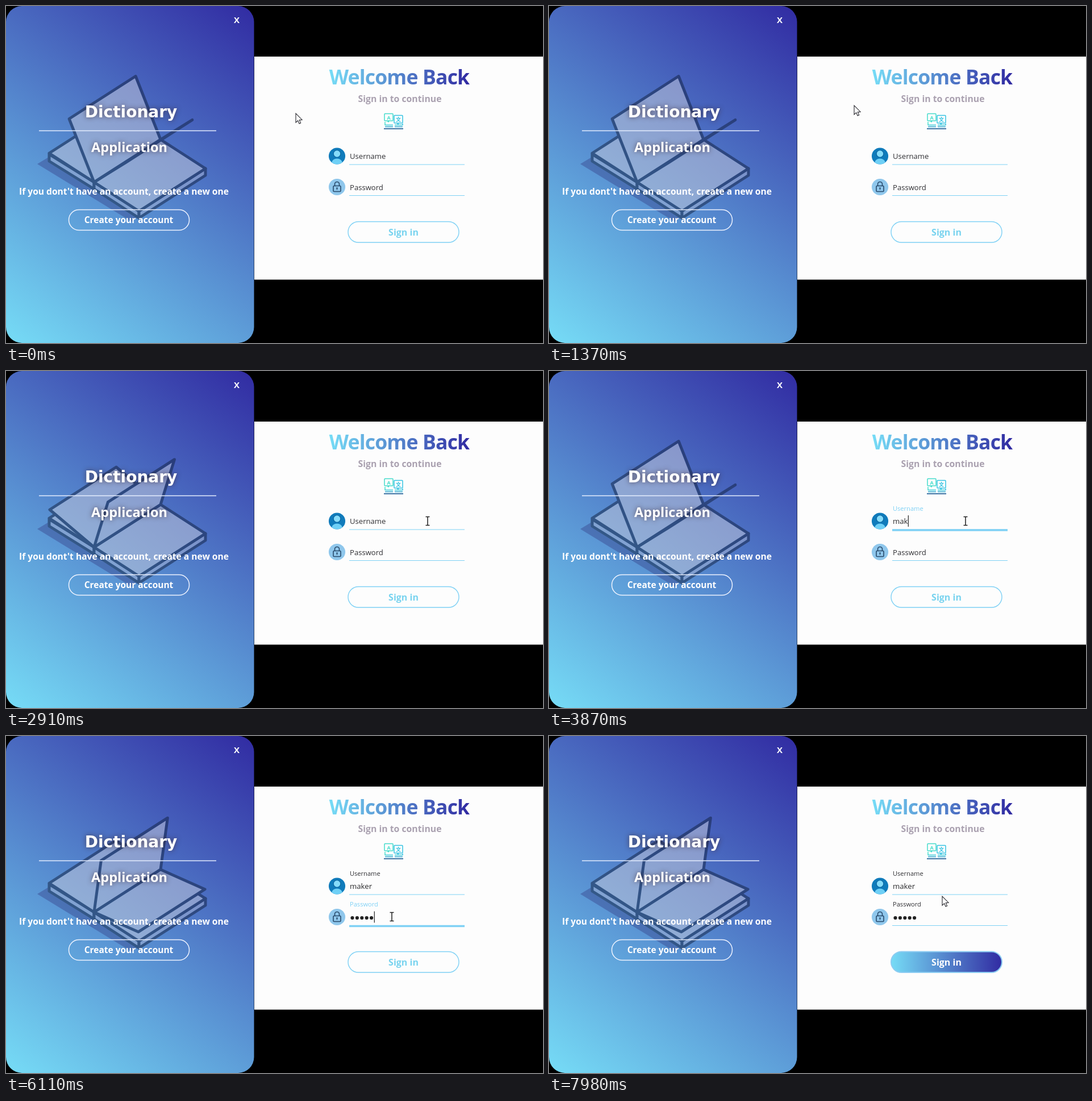
An HTML page with a canvas that plays this animation: 945 by 593 pixels, repeating every 8 s.

```html
<!DOCTYPE html>
<html lang="en">
<head>
<meta charset="utf-8">
<title>Dictionary sign in</title>
<style>
html, body { margin: 0; width: 100%; height: 100%; overflow: hidden; background: #000; }
canvas { display: block; width: 945px; height: 593px; }
</style>
</head>
<body>
<canvas id="stage" width="945" height="593"></canvas>
<script>
const W = 945, H = 593, LOOP = 8000;
const stage = document.getElementById('stage').getContext('2d');
const makeLayer = () => {
  const c = document.createElement('canvas');
  c.width = W;
  c.height = H;
  return c.getContext('2d');
};
const bookLayer = makeLayer(), frontLayer = makeLayer();
const UI = '"Open Sans", "Noto Sans", sans-serif';
const SKY = '#7fd1f5';

// ---------- helpers ----------
const clamp01 = v => Math.max(0, Math.min(1, v));
const mix = (a, b, k) => a + (b - a) * k;
const ease = k => k * k * (3 - 2 * k);
const add = (p, q) => [p[0] + q[0], p[1] + q[1]];

// Sky blue to indigo, shared by panel, title and button
function brand(g, x0, y0, x1, y1) {
  const grad = g.createLinearGradient(x0, y0, x1, y1);
  grad.addColorStop(0, '#76dcf6');
  grad.addColorStop(1, '#312ba2');
  return grad;
}

function text(g, str, x, y, font, fill, align = 'left', tracking = 0) {
  g.font = font;
  g.fillStyle = fill;
  g.textAlign = align;
  g.letterSpacing = tracking + 'px';
  g.fillText(str, x, y);
}

function paint(g, fill, stroke, width) {
  if (fill) { g.fillStyle = fill; g.fill(); }
  if (stroke) { g.strokeStyle = stroke; g.lineWidth = width; g.stroke(); }
}

function poly(g, pts, fill, stroke, width) {
  g.beginPath();
  pts.forEach(([x, y]) => g.lineTo(x, y));
  g.closePath();
  paint(g, fill, stroke, width);
}

function pill(g, x, y, w, h, r, fill, stroke, width) {
  g.beginPath();
  g.roundRect(x, y, w, h, r);
  paint(g, fill, stroke, width);
}

function disc(g, x, y, r, fill) {
  g.beginPath();
  g.arc(x, y, r, 0, Math.PI * 2);
  paint(g, fill);
}

function line(g, x0, y0, x1, y1, color, width) {
  g.beginPath();
  g.moveTo(x0, y0);
  g.lineTo(x1, y1);
  paint(g, null, color, width);
}

// ---------- book ----------
const INK = '#0f1e3e', PAPER = '#c9ccdb', EDGE = '#aab4d2';
const NEAR = [155, 310], FAR = [272, 235];
const LEAF = [79, 51], RISE = 100, THICK = [0, 12];
const FLIP = 630, STEPS = 8;
// Pose reached at a time within one flip
const PACE = [[0, 5], [112, 6], [405, 9], [600, 11], [FLIP, 5 + STEPS]];

function poseAt(phase) {
  const i = PACE.findIndex(p => phase < p[0]);
  const [t0, s0] = PACE[i - 1], [t1, s1] = PACE[i];
  return Math.floor(mix(s0, s1, (phase - t0) / (t1 - t0)));
}

// A page rises evenly, then drops faster past the upright
const pageAngle = s => 9 * s + 0.75 * Math.max(0, s - 10) ** 2;

function drawPage(g, deg) {
  const a = deg * Math.PI / 180;
  const d = [LEAF[0] * Math.cos(a), LEAF[1] * Math.cos(a) - RISE * Math.sin(a)];
  poly(g, [NEAR, FAR, add(FAR, d), add(NEAR, d)], PAPER, INK, 5);
}

function drawBook(t) {
  const g = bookLayer;
  const right = add(FAR, LEAF), front = add(NEAR, LEAF);
  const left = [NEAR[0] - LEAF[0], NEAR[1] - LEAF[1] + 2];
  g.clearRect(0, 0, W, H);
  g.lineJoin = 'round';
  poly(g, [[55, 278], [95, 254], [240, 358], [222, 380]], '#3c5096');
  [[left, NEAR], [NEAR, front], [front, right]].forEach(([a, b]) =>
    poly(g, [a, b, add(b, THICK), add(a, THICK)], EDGE, INK, 5));
  drawPage(g, 180);
  drawPage(g, 0);

  const pose = poseAt(t % FLIP);
  for (let s = pose + STEPS; s > 0; s -= STEPS) {
    const deg = pageAngle(s);
    if (deg < 180) drawPage(g, deg);
  }
}

// ---------- left panel ----------
function drawPanel(g) {
  pill(g, 0, 0, 436.5, H, 28, brand(g, 0, H, 436.5, 0));
}

function drawPanelText(g) {
  g.shadowColor = 'rgba(60,40,50,.7)';
  g.shadowBlur = 9;
  text(g, 'Dictionary', 220, 196, 'bold 28px "DejaVu Sans", sans-serif', '#fff', 'center');
  text(g, 'Application', 217, 257, 'bold 23.5px "Noto Sans", sans-serif', '#fff', 'center');
  g.shadowColor = 'transparent';
  g.shadowBlur = 0;
  line(g, 58, 219.5, 370, 219.5, '#e6eeff', 1.6);
  text(g, "If you dont't have an account, create a new one", 207.5, 331.5, `bold 15.6px ${UI}`, '#fff', 'center');
  pill(g, 110.5, 358.5, 212, 36, 18, null, '#eef3ff', 1.5);
  text(g, 'Create your account', 216, 382, `bold 15.5px ${UI}`, '#fff', 'center');
  text(g, 'X', 406, 29.5, `bold 15px ${UI}`, '#fff', 'center');
}

// ---------- right panel ----------
function bubble(g, x, y, w, h, color) {
  pill(g, x, y, w, h, 1, null, color, 1.5);
  poly(g, [[x + 4, y + h], [x + 9, y + h], [x + 7, y + h + 3]], color);
}

function drawTranslateIcon(g) {
  const teal = '#43dccb', cyan = '#35c3e2';
  bubble(g, 666, 189.5, 15, 12.5, teal);
  bubble(g, 683, 192.5, 15, 13.5, cyan);
  text(g, 'A', 673.5, 199.5, `bold 9px ${UI}`, teal, 'center');
  text(g, '文', 690.5, 203, 'bold 9px "Noto Sans CJK SC", "Noto Sans CJK JP", sans-serif', cyan, 'center');
  [667, 684].forEach(x => {
    line(g, x, 209.5, x + 14, 209.5, '#34c8d8', 1.5);
    line(g, x, 212.5, x + 14, 212.5, '#2aa5cc', 1.5);
    line(g, x - 2, 216, x + 15, 216, '#1d5f98', 1.7);
  });
  line(g, 667, 204, 667, 210, teal, 1.5);
  line(g, 698, 207, 698, 210, cyan, 1.5);
}

function drawUserIcon(g) {
  const x = 582.5, y = 264;
  g.save();
  disc(g, x, y, 14.6, '#107bbb');
  g.clip();
  g.beginPath();
  g.ellipse(x, y + 12.5, 9.5, 8, 0, 0, Math.PI * 2);
  paint(g, '#6fd0f6');
  disc(g, x, y - 4, 6.8, '#0c669f');
  disc(g, x, y - 4, 5.7, '#86dcfb');
  g.restore();
}

function drawLockIcon(g) {
  const x = 582.5, y = 318.5, ink = '#27496a';
  disc(g, x, y, 14.6, '#8fc7ec');
  pill(g, x - 6.5, y - 2, 13, 10, 1.5, null, ink, 1.6);
  g.beginPath();
  g.moveTo(x - 4, y - 2);
  g.arc(x, y - 5, 4, Math.PI, 0);
  g.lineTo(x + 4, y - 2);
  paint(g, null, ink, 1.6);
  disc(g, x, y + 2, 1.3, ink);
  line(g, x, y + 2, x, y + 5, ink, 1.3);
}

function drawForm(g) {
  g.fillStyle = '#fdfdfd';
  g.fillRect(437, 89, 508, 392.5);
  text(g, 'Welcome Back', 692, 138, `bold 35.5px ${UI}`, brand(g, 570, 0, 814, 0), 'center', -0.8);
  text(g, 'Sign in to continue', 693, 169, `bold 15.8px ${UI}`, '#aaa1b0', 'center');
  drawTranslateIcon(g);
  drawUserIcon(g);
  drawLockIcon(g);
}

// ---------- form ----------
const NAME = 'maker';
const HOVER = 6560;
const USER = { label: 'Username', y: 264, start: 3100, end: 5080, firstKey: 3480, gap: 180 };
const PASS = { label: 'Password', y: 318.5, start: 5080, end: 7050, firstKey: 5400, gap: 150, secret: true };

function drawField(g, t, f) {
  const focused = t >= f.start && t < f.end;
  const lift = ease(clamp01((t - f.start) / 250));
  text(g, f.label, 605, mix(f.y + 5, f.y - 18.5, lift), `${mix(13.1, 11.1, lift)}px ${UI}`,
    focused ? SKY : '#303034');

  const typed = Math.floor((t - f.firstKey) / f.gap) + 1;
  const count = Math.max(0, Math.min(NAME.length, typed));
  let end = 605;
  if (f.secret) {
    for (let i = 0; i < count; i++) disc(g, 609.5 + i * 8.4, f.y + 1.5, 3.1, '#222');
    end += count * 8.5;
  } else {
    const str = NAME.slice(0, count);
    text(g, str, 605, f.y + 5, `13.2px ${UI}`, '#2a2a2c');
    end += g.measureText(str).width;
  }

  line(g, 604, f.y + 15, 807, f.y + 15, SKY, 1.2);
  if (!focused) return;
  const half = 101.5 * lift;
  line(g, 705.5 - half, f.y + 16, 705.5 + half, f.y + 16, SKY, 3.4);
  const lastKey = count ? f.firstKey + (count - 1) * f.gap : f.start;
  if (Math.floor((t - lastKey) / 500) % 2 === 0) {
    line(g, end + 0.8, f.y - 10, end + 0.8, f.y + 10, '#222', 1.2);
  }
}

function drawSignIn(g, t) {
  const hot = t >= HOVER;
  pill(g, 602, 379.5, 195, 36.5, 18.2, hot && brand(g, 602, 0, 797, 0),
    hot ? '#8cccf2' : SKY, hot ? 2 : 1.4);
  text(g, 'Sign in', 699.5, 404, `bold 16px ${UI}`, hot ? '#fff' : '#78d3ef', 'center');
}

// ---------- pointer ----------
const TRAVEL = 500;
// Resting places and the time the pointer leaves each
const STOPS = [
  [510, 189, 800], [537, 175, 2000], [742, 264, 3300], [733, 264, 4350],
  [671, 318, 5500], [679, 318, 6150], [702, 396, 7300], [692, 282, LOOP]
];

function pointerAt(t) {
  const i = STOPS.findIndex(s => t < s[2]);
  if (i === 0) return STOPS[0];
  const a = STOPS[i - 1], b = STOPS[i];
  const k = ease(clamp01((t - a[2]) / TRAVEL));
  return [mix(a[0], b[0], k), mix(a[1], b[1], k)];
}

function drawPointer(g, t) {
  const [x, y] = pointerAt(t);
  const inField = x > 604 && x < 807 && [USER, PASS].some(f => Math.abs(y - f.y) < 15);
  if (inField) {
    line(g, x, y - 7, x, y + 7, '#1c1c1c', 1.5);
    [-7.5, 7.5].forEach(d => line(g, x - 3.5, y + d, x + 3.5, y + d, '#1c1c1c', 1.4));
    return;
  }
  const arrow = [[0, 0], [0, 16], [3.7, 12.6], [6, 18], [8.6, 17], [6.3, 11.6], [11, 11.2]];
  poly(g, arrow.map(p => add(p, [x, y])), '#fff', '#26262c', 1.1);
}

// ---------- playback ----------
function render(t) {
  const g = stage;
  g.fillStyle = '#000';
  g.fillRect(0, 0, W, H);
  drawPanel(g);
  drawBook(t);
  g.globalAlpha = 0.5;
  g.drawImage(bookLayer.canvas, 0, 0);
  g.globalAlpha = 1;
  g.drawImage(frontLayer.canvas, 0, 0);
  drawField(g, t, USER);
  drawField(g, t, PASS);
  drawSignIn(g, t);
  drawPointer(g, t);
}

drawPanelText(frontLayer);
drawForm(frontLayer);

const begun = performance.now();
function tick() {
  render((performance.now() - begun) % LOOP);
  requestAnimationFrame(tick);
}
tick();
</script>
</body>
</html>
```
